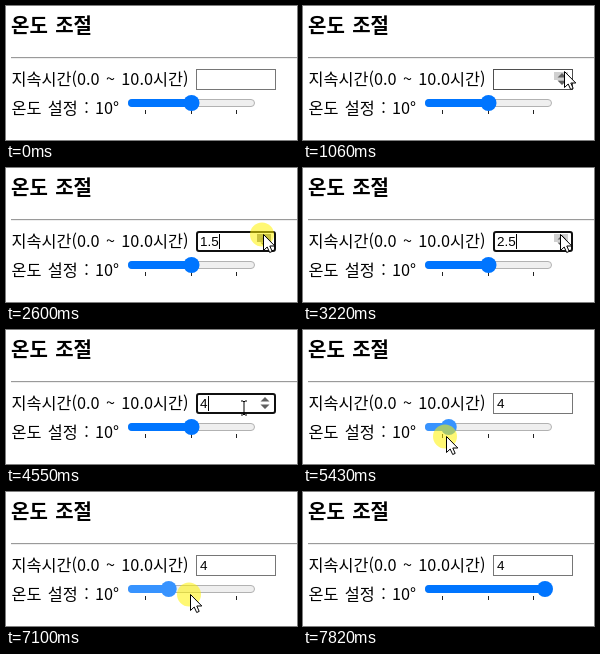
Write an HTML page that moves like this. It is 291 by 134 pixels and loops after 8.21 s.

```html
<!DOCTYPE html>
<html lang="ko">
<head>
<meta charset="utf-8">
<style>
  html, body { margin: 0; width: 100%; height: 100%; overflow: hidden; background: #fff; }
  svg { display: block; width: 100vw; height: 100vh; }
  .label { font: 350 16.3px "Noto Sans CJK KR", "Noto Sans CJK", sans-serif; word-spacing: 1.8px; }
  .title { font-size: 20px; font-weight: 700; }
  .value { font: 13.5px "Liberation Sans", Arial, sans-serif; }
</style>
</head>
<body>
<svg viewBox="0 0 291 134">
  <text class="label title" x="5" y="26.5">온도 조절</text>
  <path d="M5 51.5H291" stroke="#9a9a9a"/>
  <path d="M5 52.5H291" stroke="#eee"/>
  <text class="label" x="5.5" y="78.5">지속시간(0.0 ~ 10.0시간)</text>
  <text class="label" x="5.5" y="107.5">온도 설정 : 10°</text>

  <rect id="box" fill="#fff"/>
  <text id="value" class="value" x="194" y="78"></text>
  <path id="caret" stroke="#000"/>
  <g id="spinner">
    <rect id="upButton" x="251" y="66" width="14" height="8"/>
    <path d="M254.5 71.5L259 67L263.5 71.5ZM254.5 74.5L259 79L263.5 74.5Z" fill="#606060"/>
  </g>

  <path d="M139.5 104V108M185.5 104V108M230.5 104V108" stroke="#222"/>
  <rect x="122.5" y="93.5" width="126" height="7" rx="3.5" fill="#efefef" stroke="#b2b2b2"/>
  <g id="slider">
    <rect id="fill" x="122" y="93" height="8" rx="4"/>
    <circle id="thumb" cy="97" r="8"/>
  </g>

  <g id="pointer">
    <circle id="halo" cx="-1" cy=".5" r="12" fill="#fff200" fill-opacity=".55"/>
    <path id="arrow" d="M.5 .5V16.5L4.2 13L6.7 18.5L9.2 17.4L6.8 12H11.8Z" fill="#fff" stroke="#000"/>
    <path id="beam" d="M-3-7H-1L0-6L1-7H3M0-6V6M-3 7H-1L0 6L1 7H3" fill="none" stroke="#000"/>
  </g>
</svg>
<script>
const LOOP = 8210, TICK = 200 / 3;
const el = Object.fromEntries([...document.querySelectorAll('[id]')].map(n => [n.id, n]));

const smooth = u => u * u * u * (u * (6 * u - 15) + 10);
const easeOut = u => 1 - (1 - u) ** 1.5;
const linear = u => u;

// Pointer stops: tick, x, y, easing on the way in
const path = [
  [9, 293, 56], [16, 261, 65, easeOut],
  [17, 261, 65], [26, 257, 66, smooth],
  [67, 257, 66], [68, 238, 78, linear], [73, 185.5, 100, easeOut],
  [75, 185.5, 100], [82, 142, 106, smooth],
  [84, 142, 106], [90, 242, 106, smooth],
  [93, 242, 106], [101, 68, 106, smooth],
  [103, 68, 106], [110, 273, 99, easeOut],
  [113, 273, 99], [116, 289, 116, linear]
];
// Ticks of press and release on the up button
const clicks = [[27, 29], [32, 34], [38, 40], [42, 44], [46, 48], [51, 53], [56, 57], [60, 62]];
const DRAG = [76, 114];

const within = (k, [a, b]) => k >= a && k < b;
const clamp = (v, lo, hi) => Math.min(hi, Math.max(lo, v));
const show = (node, on) => node.setAttribute('visibility', on ? 'inherit' : 'hidden');
const set = (node, attrs) => { for (const name in attrs) node.setAttribute(name, attrs[name]); };

function pointerAt(k) {
  const i = path.findIndex(stop => stop[0] >= k);
  if (i < 1) return path[i < 0 ? path.length - 1 : 0].slice(1, 3);
  const [k0, x0, y0] = path[i - 1], [k1, x1, y1, ease = linear] = path[i];
  const u = ease((k - k0) / (k1 - k0));
  return [x0 + (x1 - x0) * u, y0 + (y1 - y0) * u];
}

function drawInput(k, x, y, present) {
  const hover = present && x > 190 && x < 270 && y > 63 && y < 84;
  const focus = within(k, [clicks[0][0], DRAG[0]]);
  const pressed = clicks.some(span => within(k, span));
  const steps = clicks.filter(c => k >= c[0]).length;
  el.value.textContent = steps ? String(steps / 2) : '';
  set(el.box, focus
    ? { x: 191, y: 64, width: 78, height: 19, rx: 2, stroke: '#101010', 'stroke-width': 2 }
    : { x: 190.5, y: 63.5, width: 79, height: 20, rx: 0, stroke: hover ? '#4f4f4f' : '#767676', 'stroke-width': 1 });
  show(el.caret, focus);
  if (focus) {
    const cx = Math.round(194 + el.value.getComputedTextLength()) + .5;
    set(el.caret, { d: `M${cx} 66V81` });
  }
  show(el.spinner, hover || focus);
  show(el.upButton, hover && x > 251 && y < 74);
  set(el.upButton, { fill: pressed ? '#8a8a8a' : '#d0d0d0' });
  const typing = hover && x < 251;
  show(el.beam, present && typing);
  show(el.arrow, present && !typing);
}

function drawSlider(k, x, y, present) {
  const drag = within(k, DRAG);
  const hover = present && x > 122 && x < 250 && y > 89 && y < 105;
  // The thumb trails the pointer a little
  const thumb = k < DRAG[0] ? 185.5 : clamp(pointerAt(k - .63)[0], 130, 242);
  set(el.slider, { fill: drag ? '#3793ff' : hover ? '#005cc8' : '#0075ff' });
  set(el.fill, { width: thumb - 122 });
  set(el.thumb, { cx: thumb });
}

function draw(ms) {
  const k = Math.floor((ms % LOOP + 9) / TICK);
  const [x, y] = pointerAt(k);
  const present = within(k, [10, 117]);
  drawInput(k, x, y, present);
  drawSlider(k, x, y, present);
  show(el.halo, present && [...clicks, DRAG].some(span => within(k, span)));
  set(el.pointer, { transform: `translate(${Math.round(x)} ${Math.round(y)})` });
}

const start = performance.now();
function loop() {
  draw(performance.now() - start);
  requestAnimationFrame(loop);
}
loop();
</script>
</body>
</html>
```
